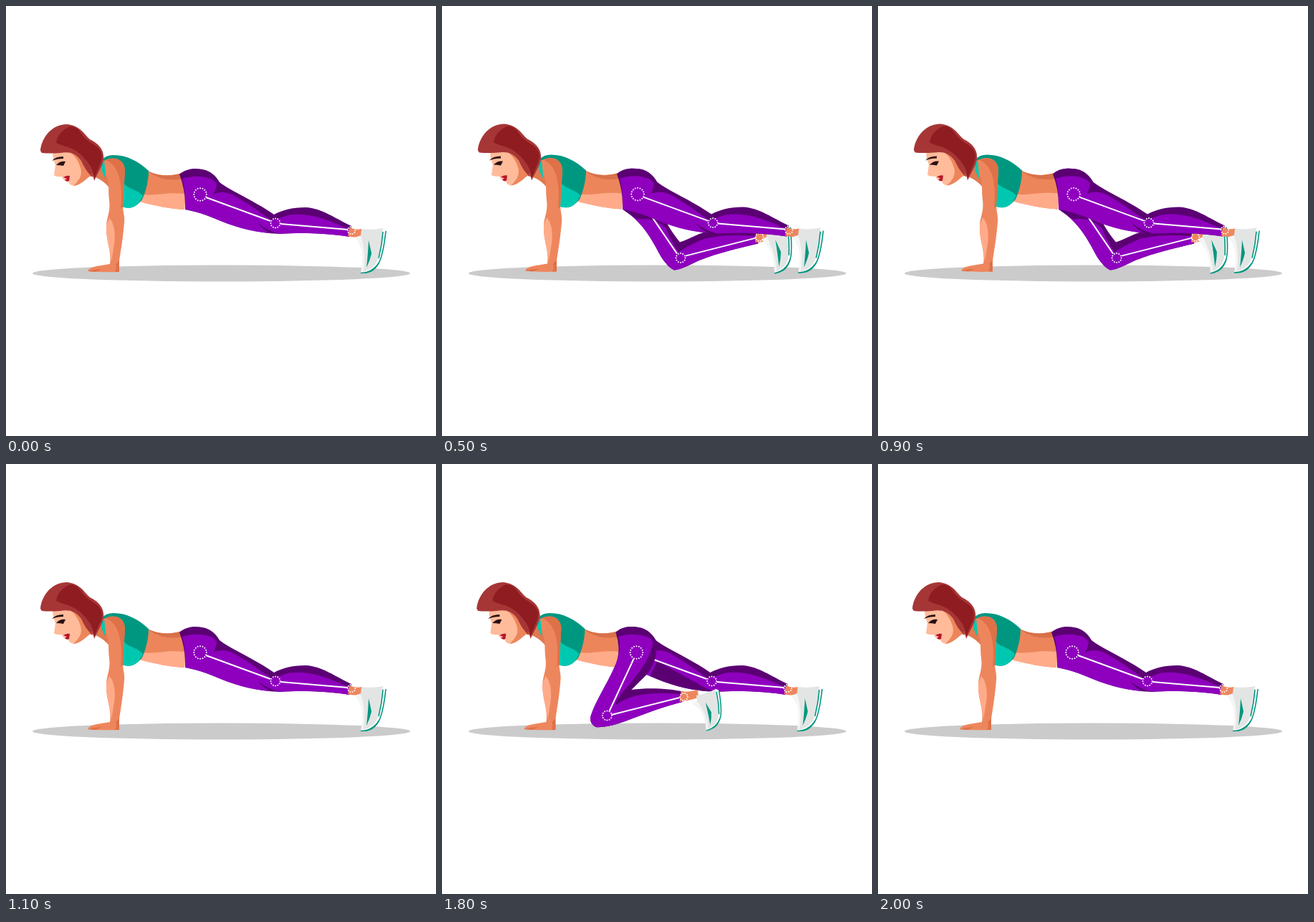
An HTML page that plays this animation: 600 px wide and 600 px high, repeating every 2200 ms.

```html
<!DOCTYPE html>
<html lang="en">
<head>
<meta charset="utf-8">
<title>Plank knee drive</title>
<style>
html, body { margin: 0; width: 100%; height: 100%; overflow: hidden; background: #fff; }
svg { display: block; width: 100%; height: 100%; }
.bone { stroke: #fff; stroke-width: 2; fill: none; }
.joint { stroke: #fff; stroke-width: 2; stroke-linecap: round; stroke-dasharray: 0 2; fill: none; }
</style>
</head>
<body>
<svg viewBox="0 0 600 600">
  <defs>
    <!-- origin: heel end of the sole -->
    <g id="shoe">
      <path fill="#e3e5e4" d="M-34-3Q-18-1-4-4L0 0C-2 18-5 36-10 46C-15 55-24 59-35 59C-33 48-31 36-34 25C-36 19-39 13-43 9L-35 6Z"/>
      <path fill="#f4f5f5" d="M-43 9L-35 7C-30 22-28 42-32 58L-35 59C-33 48-31 36-34 25C-36 19-39 13-43 9Z"/>
      <path fill="#fff" d="M-4-4L0 0C-2 18-5 36-10 46C-15 55-24 59-35 59L-33 57C-21 55-14 48-11 39C-7 25-5 12-4-4Z"/>
      <path fill="none" stroke="#00977f" stroke-width="1.6" d="M0 0C-2 18-5 36-10 45C-15 54-24 58-35 58.500M-4 1C-5 15-7 26-10 38"/>
      <path fill="#00977f" d="M-35 59C-23 57-15 52-10 43C-13 55-22 60-35 59ZM-24 13Q-22 22-20 31Q-22 41-27 51Q-25 34-24 13Z"/>
    </g>
  </defs>
  <ellipse cx="300.500" cy="373" rx="263.500" ry="11.500" fill="#cbcbcb"/>
  <g id="figure">
    <g id="far"></g>
    <g id="torso">
      <path fill="#ed855b" d="M190 226C207 237 229 239 245 233Q252 258 249 284C230 283 207 279 186 272Z"/>
      <path fill="#ffab8a" d="M190 263C210 265 226 259 250 262L249 284C230 283 207 279 186 273Z"/>
      <path fill="#d8714a" d="M198 230C212 238 230 238 245 233L246 241C228 245 210 241 198 230Z"/>
      <path fill="#e17a50" d="M106 228L136 210L150 262C143 250 133 241 121 238Q112 237 106 240Z"/>
      <path fill="#009780" d="M134 215Q139 208 150 208C169 208 185 217 199 230C199 244 195 259 190 270C180 283 171 283 162 280L160 224Z"/>
      <path fill="#00c8b0" d="M163 246C170 256 182 255 191 265L187 272C180 283 171 283 162 280ZM133 216L140 219L139 241L133 229Z"/>
    </g>
    <g id="arm">
      <path fill="#ee865d" d="M137 216C151 208 165 214 166 229L163 278C163 287 166 293 165 302C163 326 160 342 158 356L158 371Q134 372 114 370Q115 365 127 363L145 360C148 342 139 328 140 306C141 293 146 287 144 271C142 256 145 244 139 236Z"/>
      <path fill="#ffab8a" d="M144 296C151 302 154 320 150 338L147 357C147 342 139 328 140 306Z"/>
      <path fill="#de7148" d="M139 215C151 210 165 213 166 229L163 280L160 283C162 257 162 224 139 215ZM158 355L158 371H152Q155 365 153 360ZM114 370Q124 367 134 367Q128 370 124 371Z"/>
    </g>
    <g id="head">
      <path fill="#ffbb9a" d="M66 202C64 210 67 216 69 222Q68 230 67 236Q70 239 78 238Q80 244 87 245Q88 250 95 251C104 250 110 243 120 234L108 204Z"/>
      <path fill="#ed855b" d="M90 204Q100 213 103 223Q107 232 103 240Q99 247 94 251C104 250 111 242 120 235L108 204Z"/>
      <path fill="#2a1012" d="M64 216Q69 210 80 210L80 213Q71 213 64 216ZM70 222Q75 216 83 217L80 223Q75 222 70 222Z"/>
      <path fill="#b8142b" d="M80 239Q85 236 89 237L88 244Q85 246 82 243L85 241Z"/>
      <path fill="#a63636" d="M48 202C49 187 61 166 84 165C103 166 109 179 117 186C130 192 137 202 136 212C136 221 130 229 123 244Q122 237 119 233L121 239C114 233 109 225 105 216C97 205 88 203 76 205Q61 206 50 205Z"/>
      <path fill="#8f1c21" d="M70 191Q72 176 89 168Q98 168 103 175C108 182 112 187 122 193C134 200 136 209 132 219Q128 229 123 241Q122 227 114 218C106 207 96 199 83 196Q76 194 70 191Z"/>
    </g>
    <g id="near"></g>
  </g>
</svg>
<script>
const LIGHT = "#8e00be", DARK = "#5b0073", SKIN = "#ee865d";
const shape = (fill, d) => `<path fill="${fill}" d="${d}"/>`;
const bone = d => `<path class="bone" d="${d}"/>`;
const joint = (x, y, r, dots) =>
  `<circle class="joint" cx="${x}" cy="${y}" r="${r}" pathLength="${dots * 2}"/>`;
const shoe = t => `<use href="#shoe" transform="${t}"/>`;
const hipTop = "M242 235C250 227 263 226 274 228C287 230 294 239 298 246";
const hipGlow = "M246 241C264 235 287 237 294 248";
const waist = "Q251 258 242 235Z", waistGlow = "Q251 258 246 241Z";

// Each pose: outline, lit area, ankle, shoe, bones and joints
const poses = {
  straight: {
    outline: hipTop + "C315 259 347 272 374 291C385 285 399 281 418 281C441 282 460 297 482 307L479 322C450 317 411 316 382 318C349 317 316 307 290 296Q269 287 250 284" + waist,
    lit: hipGlow + "Q293 257 289 263C298 258 310 259 321 266C340 277 355 288 370 299Q381 297 393 292C421 287 451 298 481 313L479 322C450 317 411 316 382 318Q365 314 352 303Q358 312 369 317C341 315 315 307 290 296Q269 287 250 284" + waistGlow,
    ankle: "M479 309Q488 313 496 311L498 321Q487 324 477 321Z",
    shoe: "translate(530 314)",
    bones: "M279 267L369 300M383 304L477 312",
    joints: [[376, 303, 6.5, 12], [482, 313, 5.3, 10]]
  },
  middle: {
    outline: hipTop + "C306 260 304 285 311 302Q319 317 330 330C346 325 355 317 374 314C392 310 420 311 440 318L439 332C414 338 383 345 358 355C343 362 332 368 322 369Q314 366 304 351C290 324 277 301 250 284" + waist,
    lit: hipGlow + "C302 278 304 307 328 344Q346 332 365 325C392 319 417 320 441 322L439 332C414 338 383 345 358 355C343 362 332 368 322 369Q314 366 304 351C290 324 277 301 250 284" + waistGlow,
    ankle: "M436 317Q445 319 454 315L456 326Q445 331 435 330Z",
    shoe: "translate(484 309) rotate(-12)",
    bones: "M275 271L326 346M338 349L436 324",
    joints: [[331, 352, 6.5, 12], [441, 323, 5.3, 10]]
  },
  forward: {
    outline: hipTop + "C302 265 294 287 280 299Q271 308 264 315C287 312 317 313 337 318L335 332C307 339 279 350 252 360C238 365 224 368 214 367Q205 362 207 352C214 330 230 307 240 284Q251 262 242 235Z",
    lit: hipGlow + "C292 270 273 294 252 318Q242 330 241 337C256 326 270 323 284 321Q314 318 337 322L335 332C307 339 279 350 252 360C238 365 224 368 214 367Q205 362 207 352C214 330 230 307 240 284Q251 262 246 241Z",
    ankle: "M333 317Q344 319 356 315L358 326Q344 330 331 332Z",
    shoe: "translate(386 316) rotate(-17) scale(.95 .83)",
    bones: "M267 272L233 345M236 350L331 326",
    joints: [[230, 351, 6.5, 12], [337, 325, 5.3, 10]]
  }
};
const farShade = {
  straight: "M300 275L352 304L369 317C341 315 315 307 290 296Z",
  middle: "M250 284L300 290L314 314Q297 294 270 298Z",
  forward: "M240 284H300L264 315Q270 297 236 291Z"
};

function leg(name, near) {
  const p = poses[name];
  return shape(DARK, p.outline) + shape(LIGHT, p.lit) + shape(SKIN, p.ankle) +
    (near ? joint(271, 263, 8.8, 16) : shape(DARK, farShade[name])) +
    shoe(p.shoe) + bone(p.bones) + p.joints.map(j => joint(...j)).join("");
}

// end time, near leg, far leg, body shift
const steps = [
  [500, "straight", "", 0, 0],
  [700, "straight", "middle", 2, -.4],
  [900, "straight", "forward", 0, 0],
  [1100, "straight", "middle", 2, -.4],
  [1600, "straight", "", 0, 0],
  [1800, "middle", "straight", 2, 0],
  [2000, "forward", "straight", .4, 0],
  [2200, "straight", "", 0, 0]
];
const el = id => document.getElementById(id);
let shown;

function draw(now) {
  const step = steps.find(s => now % 2200 < s[0]);
  if (step !== shown) {
    const [, near, far, dx, dy] = shown = step;
    el("near").innerHTML = leg(near, true);
    el("far").innerHTML = far && leg(far, false);
    el("figure").setAttribute("transform", `translate(${dx} ${dy})`);
  }
  requestAnimationFrame(draw);
}
draw(performance.now());
</script>
</body>
</html>
```
